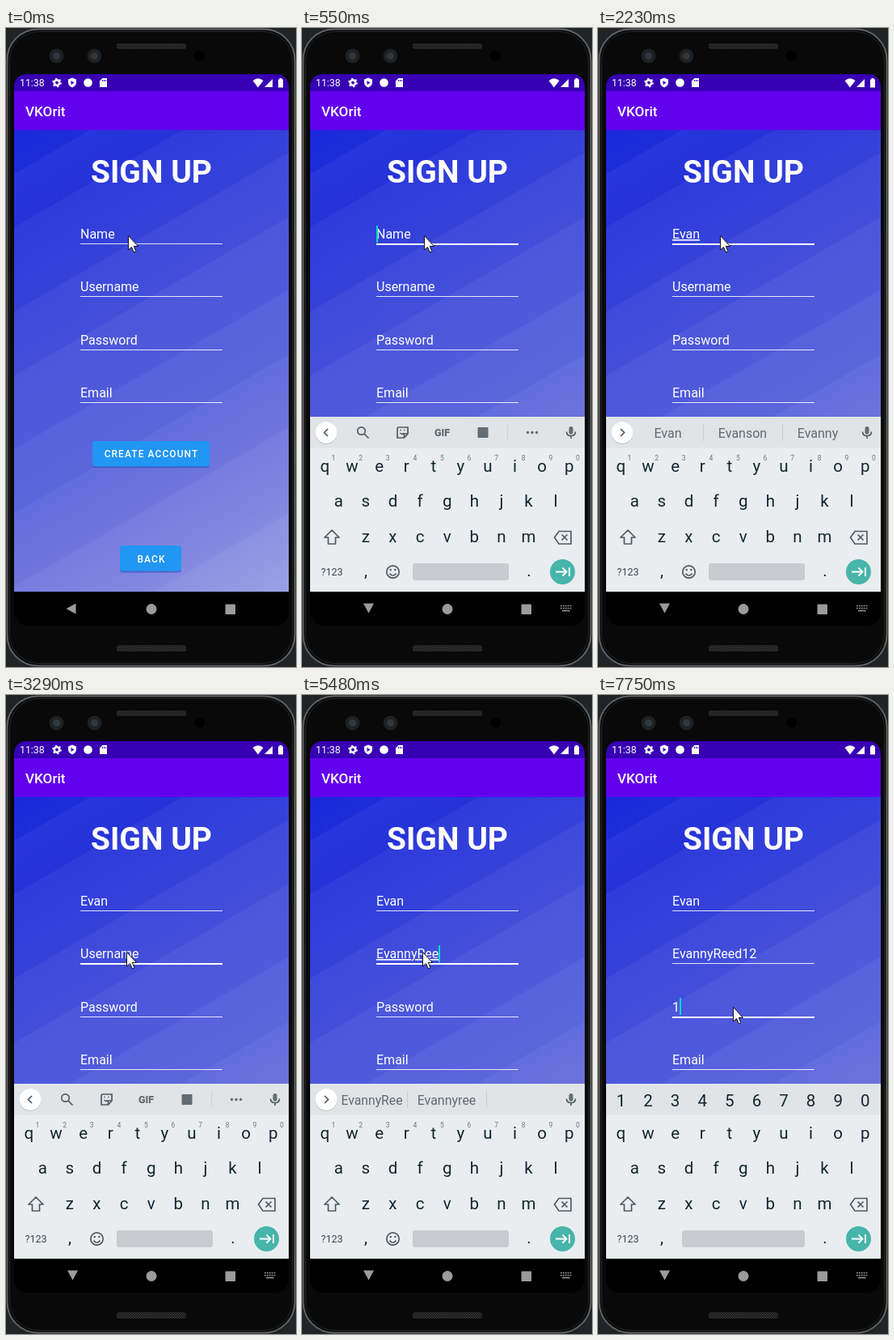
An HTML page that plays this animation: 359 by 789 pixels, repeating every 8 s.

```html
<!DOCTYPE html>
<html lang="en">
<head>
<meta charset="utf-8">
<title>Sign up form</title>
<style>
  html, body { margin: 0; width: 100%; height: 100%; overflow: hidden; background: #202427; }
  svg { display: block; width: 359px; height: 789px; }
  text { font-family: Roboto, sans-serif; white-space: pre; }
  .mid { text-anchor: middle; }
  .medium { font-weight: 500; }
  .button { font-size: 12px; font-weight: 500; letter-spacing: 1.07px; fill: #fff; text-anchor: middle; }
  .key { font-size: 20.5px; fill: #13262d; text-anchor: middle; }
  .hint { font-size: 8.5px; fill: #6d767c; text-anchor: middle; }
  .word { font-size: 16px; fill: #626a6f; text-anchor: middle; }
  .field { font-size: 16px; fill: #fff; }
  .composing { text-decoration: underline; text-decoration-thickness: 1px; }
  .line { fill: none; stroke: #4f5b62; stroke-width: 1.7; }
</style>
</head>
<body>
<svg viewBox="0 0 359 789">
  <defs>
    <clipPath id="screen"><path d="M10 72A15 15 0 0 1 25 57H335A15 15 0 0 1 350 72V721A17 17 0 0 1 333 738H27A17 17 0 0 1 10 721Z"/></clipPath>
    <linearGradient id="base" gradientUnits="userSpaceOnUse" x1="10" y1="126" x2="342" y2="701">
      <stop offset="0" stop-color="#1828da"/>
      <stop offset=".16" stop-color="#2533d9"/>
      <stop offset=".38" stop-color="#414dda"/>
      <stop offset=".62" stop-color="#5c66db"/>
      <stop offset=".84" stop-color="#8085df"/>
      <stop offset="1" stop-color="#9da1e4"/>
    </linearGradient>
    <linearGradient id="bands" gradientUnits="userSpaceOnUse" x1="10" y1="126" x2="342" y2="701"/>
    <pattern id="mesh" width="3" height="3" patternUnits="userSpaceOnUse">
      <rect width="3" height="3" fill="#161616"/>
      <path d="M0 0L3 3M3 0L0 3" stroke="#3a3a3a" stroke-width=".7"/>
    </pattern>
  </defs>

  <!-- phone body -->
  <rect x="1.500" y="1.500" width="356" height="786" rx="38" fill="#090909" stroke="#5f6163" stroke-width="2"/>
  <rect x="4.500" y="4.500" width="350" height="780" rx="36" fill="#090909" stroke="#262626"/>
  <rect x="137" y="19" width="86" height="7" rx="3" fill="url(#mesh)"/>
  <rect x="137" y="762" width="86" height="8" rx="3" fill="url(#mesh)"/>
  <g fill="#1d2124">
    <circle cx="62.500" cy="34.500" r="9"/><circle cx="109.500" cy="34.500" r="9"/>
  </g>
  <g fill="#30373d">
    <circle cx="62.500" cy="34.500" r="4.500"/><circle cx="109.500" cy="34.500" r="4.500"/>
  </g>
  <circle cx="239.500" cy="34.500" r="6.500" fill="#000"/>

  <g clip-path="url(#screen)">
    <path d="M10 126H350V696H10Z" fill="url(#base)"/>
    <path d="M10 126H350V696H10Z" fill="url(#bands)"/>
    <path d="M10 57H350V78H10Z" fill="#3700b3"/>
    <path d="M10 78H350V126H10Z" fill="#6200ee"/>

    <!-- status bar -->
    <g fill="#fff">
      <text x="17" y="72" font-size="12.300">11:38</text>
      <circle cx="63" cy="67.500" r="3.200" fill="none" stroke="#fff" stroke-width="2.600"/>
      <circle cx="63" cy="67.500" r="5" fill="none" stroke="#fff" stroke-width="1.600" stroke-dasharray="2.200 3.036"/>
      <path d="M82 61.500L87 63.500V67Q87 71.500 82 73.500Q77 71.500 77 67V63.500Z"/>
      <path d="M80.500 65V70L84.500 67.500Z" fill="#3700b3"/>
      <circle cx="101.500" cy="67.500" r="5.300"/>
      <path d="M119.500 62H125V73H116V65.500Z"/>
      <path d="M119.500 64V66M121.500 64V66M123.300 64V66" stroke="#3700b3"/>
      <path d="M312 73.500L305.500 65Q312 59.500 318.500 65Z"/>
      <path d="M320 73H330V63Z"/>
      <path d="M337 63.500H338.500V62H341.500V63.500H343V73.500H337Z"/>
    </g>

    <text x="24" y="109" class="medium" font-size="17.100" fill="#fff">VKOrit</text>
    <text x="180" y="191" class="mid" font-size="39" font-weight="700" fill="#fff">SIGN UP</text>

    <g id="fields"></g>
    <rect id="caret" width="2" height="21" fill="#03dac5"/>

    <g fill="#1a3fae" opacity=".45">
      <rect x="107" y="511.500" width="145" height="31.500" rx="3.500"/>
      <rect x="141" y="641" width="76" height="31.500" rx="3.500"/>
    </g>
    <g fill="#2196f3">
      <rect x="107" y="510" width="145" height="31.500" rx="3.500"/>
      <rect x="141" y="639" width="76" height="31.500" rx="3.500"/>
    </g>
    <text x="180" y="530" class="button">CREATE ACCOUNT</text>
    <text x="180" y="659.500" class="button">BACK</text>

    <!-- navigation bar -->
    <path d="M10 696H350V738H10Z" fill="#000"/>
    <g fill="#9b9b9b">
      <path id="back" d="M74.500 717L86.500 710.500V723.500Z"/>
      <circle cx="180" cy="717.500" r="6.500"/>
      <rect x="271.500" y="711.500" width="12.500" height="12.500" rx="1"/>
      <g id="switcher" fill="none" stroke="#9b9b9b" stroke-width="1.500">
        <path d="M320 713.500H333.500M320 716.500H333.500" stroke-dasharray="1.800 1.100"/>
        <path d="M322 719.500H331.500"/>
      </g>
    </g>

    <g id="keyboard">
      <path d="M10 480H350V696H10Z" fill="#e9edf0"/>
      <path d="M10 480H350V518.500H10Z" fill="#e0e4e7"/>
      <g id="keys"></g>
      <path d="M37 620L46 629H41.500V637H32.500V629H28Z" class="line" stroke-linejoin="round"/>
      <path d="M312.500 629L318 621.500H333V637H318ZM321.500 625.500L328.500 632.500M328.500 625.500L321.500 632.500" class="line"/>
      <text x="37" y="676" class="mid" font-size="12.500" fill="#3b484f">?123</text>
      <text x="79" y="677" class="key">,</text>
      <text x="281" y="677" class="key">.</text>
      <rect id="space" y="661" height="21" rx="3" fill="#c8ccd0"/>
      <g id="emoji">
        <circle cx="112.500" cy="671.500" r="7.700" class="line"/>
        <path d="M108.500 673.500Q112.500 679 116.500 673.500" class="line"/>
        <circle cx="109.700" cy="669" r="1.200" fill="#4f5b62"/><circle cx="115.300" cy="669" r="1.200" fill="#4f5b62"/>
      </g>
      <circle cx="322.500" cy="671.500" r="15.500" fill="#47b5aa"/>
      <path d="M314 671.500H327M322.500 666.500L327.500 671.500L322.500 676.500M331 666V677" fill="none" stroke="#fff" stroke-width="1.900"/>

      <g id="strip">
        <circle cx="30" cy="500.500" r="13.300" fill="#b9bec2"/>
        <circle cx="30" cy="499.500" r="13.300" fill="#fff"/>
        <path id="chevron" d="M28 495L32.500 499.500L28 504" class="line"/>
        <g fill="#626c72">
          <rect x="330.500" y="492" width="5" height="9.500" rx="2.500"/>
          <path d="M327.500 498.500Q327.500 503.500 333 503.500T338.500 498.500M333 503.500V507" class="line" stroke-width="1.500"/>
        </g>
      </g>
      <g id="tools">
        <circle cx="73.500" cy="497.500" r="4.700" class="line"/>
        <path d="M77 501L82.500 506.500" class="line"/>
        <path d="M119.500 493H131V501L126.500 506H118V494.500Q118 493 119.500 493ZM126.500 506V501H131M121.500 500Q124 503 126 500" class="line"/>
        <path d="M121.500 496.500H123M126 496.500H127.500" class="line"/>
        <text x="173.500" y="504" class="mid" font-size="12.500" font-weight="900" fill="#626c72">GIF</text>
        <rect x="217.500" y="493" width="13" height="13" rx="1" fill="#626c72"/>
        <path d="M254.500 489V510" stroke="#cdd2d5"/>
        <g fill="#626c72">
          <circle cx="279.500" cy="499.500" r="1.700"/><circle cx="285" cy="499.500" r="1.700"/><circle cx="290.500" cy="499.500" r="1.700"/>
        </g>
      </g>
      <g id="words">
        <path d="M130.500 489V510M228.500 489V510" stroke="#c9ced1"/>
      </g>
    </g>
  </g>

  <path id="pointer" d="M0 0V17.500L4 14L6.800 20.500L9.400 19.400L6.800 13H12Z" fill="#fff" stroke="#111"/>
</svg>

<script>
const LOOP = 8000, LEFT = 92, PITCH = 65.3;
const $ = id => document.getElementById(id);

function add(parent, tag, attrs, label = "") {
  const el = document.createElementNS("http://www.w3.org/2000/svg", tag);
  for (const k in attrs) el.setAttribute(k, attrs[k]);
  el.textContent = label;
  return parent.appendChild(el);
}
const show = (el, on) => el.style.display = on ? "" : "none";

// Diagonal bands: each starts slightly lighter and fades into the next.
const edges = [47, 104, 194, 263, 341, 410, 488, 580, 664];
edges.slice(0, -1).forEach((edge, i) => {
  const stop = (at, alpha) => add($("bands"), "stop", { offset: at / 664, "stop-color": "#fff", "stop-opacity": alpha });
  if (!i) stop(edge, 0);
  stop(edge, .045);
  stop(edges[i + 1], 0);
});

// Keyboard letters, with digit hints or a digit row above them.
const keyRow = (parent, label, x, y, cls) =>
  [...label].forEach((ch, i) => add(parent, "text", { x: x + i * 33.6, y, class: cls }, ch));
keyRow($("keys"), "qwertyuiop", 28.4, 547.5, "key");
keyRow($("keys"), "asdfghjkl", 45.3, 591, "key");
keyRow($("keys"), "zxcvbnm", 78.8, 635, "key");
const hints = add($("keyboard"), "g", {});
keyRow(hints, "1234567890", 39, 533.5, "hint");
const digits = add($("keyboard"), "g", {});
keyRow(digits, "1234567890", 28.4, 507.5, "key");

const fields = ["Name", "Username", "Password", "Email"].map((hint, i) => ({
  hint,
  text: add($("fields"), "text", { x: LEFT, y: Math.round(260 + i * PITCH), class: "field" }),
  rule: add($("fields"), "rect", { x: LEFT, y: Math.round(266 + i * PITCH), width: 176, fill: "#fff" })
}));

// Suggestions are condensed when they are wider than their slot.
const slots = [[86.5, 76], [179, 87], [272, 76]].map(([x, room]) => ({
  room, el: add(add($("words"), "g", { transform: `translate(${x} 506)` }), "text", { class: "word" })
}));

const start = {
  values: ["", "", "", ""], focus: -1, caret: 0, words: null,
  keyboard: 0, drop: 0, turn: 0, numeric: 0, mouse: [151, 256]
};
const typed = (i, value, ...words) => s => ({
  values: s.values.map((v, n) => n === i ? value : v), caret: 1, words: words.length ? words : null
});
const set = change => () => change;

const steps = [
  [120, set({ focus: 0, caret: 1 })],
  [400, set({ keyboard: .5, drop: 66, turn: 60 })],
  [550, set({ keyboard: 1, drop: 0, turn: 90 })],
  [700, set({ caret: 0 })],
  [1190, set({ caret: 1 })],
  [1340, typed(0, "E", "E", "Even", "Every")],
  [1490, typed(0, "Ev", "Ev", "Even", "Every")],
  [1640, typed(0, "Eva", "Eva", "Evan", "Evans")],
  [1800, typed(0, "Evan", "Evan", "Evanson", "Evanny")],
  [2230, set({ caret: 0 })],
  [2360, set({ mouse: [151, 268] })],
  [2490, set({ mouse: [150, 291] })],
  [2620, set({ mouse: [149, 310] })],
  [2750, set({ mouse: [149, 317] })],
  [2880, set({ focus: 1, caret: 1 })],
  [3010, set({ words: null })],
  [3290, set({ caret: 0 })],
  [3770, typed(1, "E", "E", "Even", "Every")],
  [3910, typed(1, "Ev", "Ev", "Even", "Every")],
  [4050, typed(1, "Eva", "Eva", "Evan", "Evans")],
  [4480, typed(1, "Evan", "Evan", "Evanson", "Evanny")],
  [4610, typed(1, "Evann", "Evann", "Evanny", "Evanna")],
  [4920, typed(1, "Evanny", "Evanny", "Evannys", "Evanny's")],
  [5190, typed(1, "EvannyR", "EvannyR", "Evanny", "Evanny's")],
  [5480, typed(1, "EvannyRee", "EvannyRee", "Evannyree")],
  [5600, typed(1, "EvannyReed", "EvannyReed", "Evannyreed")],
  [6040, typed(1, "EvannyReed1", "EvannyReed1", "Evannyreed1")],
  [6200, typed(1, "EvannyReed12", "EvannyReed12", "Evannyreed12")],
  [6670, set({ mouse: [186, 347] })],
  [6830, set({ mouse: [175, 371] })],
  [6980, set({ mouse: [167, 385] })],
  [7140, set({ focus: 2 })],
  [7290, set({ numeric: 1, words: null })],
  [7750, typed(2, "1")]
];

function stateAt(time) {
  return steps.reduce((s, [at, change]) => at <= time ? { ...s, ...change(s) } : s, start);
}

function draw(s) {
  fields.forEach((f, i) => {
    const focused = i === s.focus, value = s.values[i];
    f.text.textContent = value || f.hint;
    f.text.classList.toggle("composing", focused && value !== "" && i < 2);
    f.rule.setAttribute("height", focused ? 2 : 1);
    f.rule.setAttribute("opacity", focused ? 1 : .85);
  });

  show($("caret"), s.caret && s.focus >= 0);
  if (s.focus >= 0) {
    const width = s.values[s.focus] ? fields[s.focus].text.getComputedTextLength() : 0;
    $("caret").setAttribute("x", Math.round(LEFT + width));
    $("caret").setAttribute("y", Math.round(243.5 + s.focus * PITCH));
  }

  show($("keyboard"), s.keyboard);
  $("keyboard").setAttribute("opacity", s.keyboard);
  $("keyboard").setAttribute("transform", `translate(0 ${s.drop})`);
  show($("switcher"), s.keyboard);
  $("back").setAttribute("transform", `translate(0 ${-s.turn / 36}) rotate(${-s.turn} 82.5 717)`);

  show(digits, s.numeric);
  show(hints, !s.numeric);
  show($("emoji"), !s.numeric);
  show($("strip"), !s.numeric);
  show($("tools"), !s.numeric && !s.words);
  show($("words"), !s.numeric && s.words);
  $("space").setAttribute("x", s.numeric ? 104 : 137);
  $("space").setAttribute("width", s.numeric ? 152 : 119);
  $("chevron").setAttribute("transform", s.words ? "" : "rotate(180 30 499.5)");

  if (s.words) slots.forEach(({ el, room }, i) => {
    el.textContent = s.words[i] || "";
    const width = el.getComputedTextLength();
    el.setAttribute("transform", `scale(${width > room ? room / width : 1} 1)`);
  });

  $("pointer").setAttribute("transform", `translate(${s.mouse[0] + .5} ${s.mouse[1] + .5})`);
}

const origin = performance.now();
function frame() {
  draw(stateAt((performance.now() - origin) % LOOP));
  requestAnimationFrame(frame);
}
frame();
</script>
</body>
</html>
```
